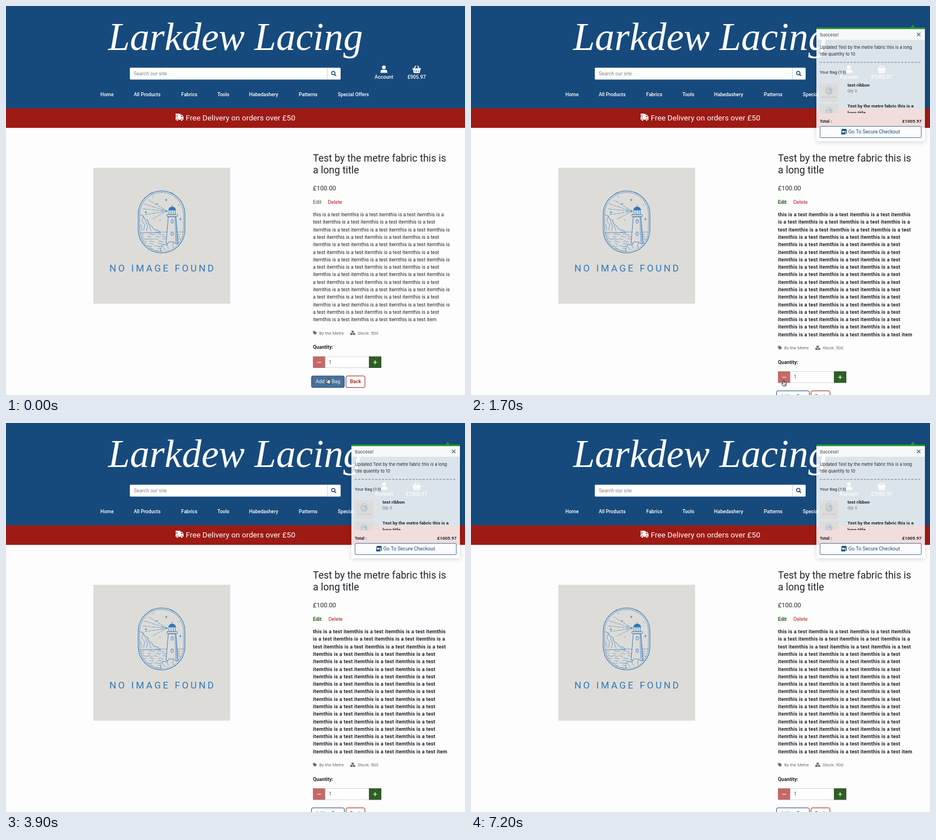
An HTML page with a canvas that plays this animation: 812x690 px, repeating every 7.3 s.

```html
<!DOCTYPE html>
<html lang="en">
<head>
<meta charset="utf-8">
<title>Larkdew Lacing</title>
<style>
html, body { margin: 0; width: 100%; height: 100%; overflow: hidden; background: #fdfdfe; }
canvas { display: block; }
</style>
</head>
<body>
<canvas id="stage" width="812" height="690"></canvas>
<script>
const ctx = document.getElementById('stage').getContext('2d');
const LOOP = 7300, RELOAD = 1500, FADE = 150, CURSOR_GONE = 3200;
const NAVY = '#174a7c', RED = '#9e1a14', GREEN = '#2f5e24', INK = '#212529',
      GREY = '#666a6e', PAPER = '#dddcd9', SKY = '#2f78b9', PAGE = '#fdfdfe';
const SANS = 'Roboto, sans-serif';
const clamp = v => Math.max(0, Math.min(1, v));

function text(str, x, y, size, color, { weight = 400, align = 'left', family = SANS, spacing = 0, style = '' } = {}) {
  ctx.font = `${style} ${weight} ${size}px ${family}`;
  ctx.letterSpacing = spacing + 'px';
  ctx.textAlign = align;
  ctx.fillStyle = color;
  ctx.fillText(str, x, y);
}

function rect(x, y, w, h, color) {
  ctx.fillStyle = color;
  ctx.fillRect(x, y, w, h);
}

function box(x, y, w, h, r, fill, border, width = 1) {
  ctx.beginPath();
  ctx.roundRect(x, y, w, h, r);
  if (fill) { ctx.fillStyle = fill; ctx.fill(); }
  if (border) { ctx.strokeStyle = border; ctx.lineWidth = width; ctx.stroke(); }
}

function shape(d, fill, border, width = 1) {
  const path = new Path2D(d);
  if (fill) { ctx.fillStyle = fill; ctx.fill(path); }
  if (border) { ctx.strokeStyle = border; ctx.lineWidth = width; ctx.stroke(path); }
}

function disc(x, y, r, fill, border, width) {
  box(x - r, y - r, 2 * r, 2 * r, r, fill, border, width);
}

function at(x, y, draw, scale = 1) {
  ctx.save();
  ctx.translate(x, y);
  ctx.scale(scale, scale);
  draw();
  ctx.restore();
}

function random(seed) {
  return () => (seed = (seed * 16807) % 2147483647) / 2147483647;
}

function star(x, y, r) {
  const k = r * 0.2;
  at(x, y, () => shape(`M0 ${-r}L${k} ${-k}L${r} 0L${k} ${k}L0 ${r}L${-k} ${k}L${-r} 0L${-k} ${-k}Z`, SKY));
}

function seaScene() {
  ctx.lineCap = ctx.lineJoin = 'round';
  box(79.5, 41, 82.5, 110, 41.25, null, SKY, 1.1);
  box(82, 43.5, 77.5, 105, 38.75, null, SKY, 0.6);
  ctx.clip();

  ctx.setLineDash([4, 2, 7, 2]);
  for (const [x, y] of [[98, 57], [90, 64], [88, 73], [92, 83], [104, 91]])
    shape(`M131 77L${x} ${y}`, null, SKY, 0.6);
  ctx.setLineDash([]);

  star(129, 57, 3);
  star(93, 79, 3);
  star(154, 91, 3);
  star(113, 64, 2);
  star(106, 51, 1.5);
  star(151, 66, 1.5);
  star(118, 93, 1.5);

  shape('M82 83L88 85L91 91L96 93L98 100L103 103L107 109L115 111L119 115H82', null, SKY, 0.8);
  shape('M88 86L86 95L91 101L89 111M92 94L96 103L94 112M99 103L102 112M84 101L86 111', null, SKY, 0.6);
  shape('M110 114H131M147 114H160', null, SKY, 0.6);

  const rnd = random(41);
  for (let y = 118; y < 149; y += 4.2)
    for (let x = 82 + rnd() * 6; x < 158; x += 9 + rnd() * 8) {
      const w = 5 + rnd() * 6;
      shape(`M${x} ${y}q${w / 4} -2 ${w / 2} 0t${w / 2} 0`, null, SKY, 0.6);
    }

  shape('M133 87H146L150 134H129Z', PAPER, SKY, 0.9);
  for (let y = 89; y < 132; y += 2)
    shape(`M${144 + (y - 89) * 0.03} ${y}H${146 + (y - 89) * 0.08}`, null, SKY, 0.7);
  box(137.5, 92, 4, 6, 1.5, PAPER, SKY, 0.9);
  box(137.5, 114, 4, 6, 1.5, PAPER, SKY, 0.9);
  box(130, 83, 19, 3.5, 1, PAPER, SKY, 0.9);
  box(134, 75, 11, 8, 0, PAPER, SKY, 0.8);
  shape('M137.5 75V83M141.5 75V83M139.5 66V69', null, SKY, 0.8);
  shape('M132.5 75Q134 69 139.5 69Q145 69 146.5 75Z', SKY);
  shape('M119 143L124 136L130 137L134 131L142 132L147 135L154 133L160 140L157 151H122Z', PAPER, SKY, 0.8);
  shape('M130 137L133 143M142 132L140 140L146 144M154 134L151 141M124 141L127 146', null, SKY, 0.6);
}

function placeholder(x, y, scale = 1) {
  at(x, y, () => {
    rect(0, 0, 242, 241, PAPER);
    ctx.save();
    seaScene();
    ctx.restore();
    text('NO IMAGE FOUND', 28.5, 184.3, 16.8, SKY, { spacing: 3.6 });
  }, scale);
}

function header(total) {
  rect(0, 0, 812, 182, NAVY);
  rect(0, 181.5, 812, 34.7, RED);
  text('Larkdew Lacing', 406, 78, 69, '#fff',
    { align: 'center', style: 'italic', family: '"Liberation Serif", serif' });

  box(219, 109.5, 373, 21, 1.5, '#fff');
  rect(568, 110, 1, 20, '#cbd3dc');
  text('Search our site', 226, 122.5, 8.8, '#7f868d');
  disc(579, 119, 3, null, NAVY, 1.4);
  shape('M581.3 121.3L584 124', null, NAVY, 1.7);

  disc(668.5, 108.7, 3.3, '#fff');
  shape('M662.5 118.5V117Q662.5 113 666 113H671Q674.5 113 674.5 117V118.5Z', '#fff');
  text('Account', 668.5, 129, 8.8, '#fff', { weight: 500, align: 'center' });

  shape('M722 111L725 106M731 111L728 106', null, '#fff', 1.5);
  shape('M719 110.5H734V112.5H733L731.7 119H721.3L720 112.5H719Z', '#fff');
  shape('M723.5 114V117.5M726.5 114V117.5M729.5 114V117.5', null, NAVY, 0.9);
  text(total, 726.5, 129, 8.8, '#fff', { weight: 500, align: 'center' });

  const nav = { 'Home': 167, 'All Products': 226, 'Fabrics': 310, 'Tools': 374,
    'Habedashery': 430, 'Patterns': 518, 'Special Offers': 587 };
  for (const [label, x] of Object.entries(nav))
    text(label, x, 160, 8.7, '#fff', { weight: 500 });

  shape('M300 191H308.5V193H311.5L314 196.5V202H300Z', '#fff');
  shape('M298 193.8H304M299 196.6H304', null, RED, 0.9);
  shape('M309.5 194.5H311L312.5 196.8H309.5Z', RED);
  disc(303.2, 202, 2, '#fff', RED, 0.9);
  disc(310.8, 202, 2, '#fff', RED, 0.9);
  text('Free Delivery on orders over £50', 318, 202.5, 13.6, '#fff');
}

function description(bold) {
  const unit = 'itemthis is a test', triple = [unit, unit, unit].join(' ');
  const tail = ' ' + unit + ' ' + unit + ' ';
  let lines;
  if (bold) {
    lines = ['this is a test' + tail + 'itemthis', 'is a test' + tail + 'itemthis is a',
      'test ' + triple, ...Array(13).fill(triple), triple + ' item'];
  } else {
    lines = ['this is a test' + tail + 'itemthis is a', 'test ' + triple];
    for (let i = 0; i < 12; i++) lines.push(i % 2 ? 'a test ' + triple : triple + ' itemthis is');
    lines.push(triple + ' item');
  }
  const look = bold ? { weight: 700, spacing: 0.18 } : {};
  lines.forEach((line, i) => text(line, 543, 373.2 + i * 13.28, bold ? 9 : 8.82, INK, look));
}

function button(label, x, w, color, fill, ink) {
  box(x + 0.5, 656.2, w - 1, 20.5, 2.5, fill, color);
  text(label, x + w / 2, 669, 8.9, ink, { weight: 500, align: 'center' });
}

function orderForm(t, reloaded) {
  shape('M543 576.5H546.5L550 580L546.7 583.3L543 579.7Z', GREY);
  disc(544.6, 578, 0.6, PAGE);
  text('By the Metre', 554, 582.7, 7.8, GREY);
  for (const [x, y] of [[611.3, 576], [609, 580], [613.7, 580]]) box(x, y, 4, 3.6, 0.8, GREY);
  text('Stock: 500', 622, 582.7, 7.8, GREY);
  text('Quantity:', 543, 608.3, 8.8, INK, { weight: 700 });

  box(564.5, 622, 78, 19.5, 0, '#fff', '#d3d8dd');
  rect(543, 621.5, 21.5, 20.5, '#c36a69');
  rect(642, 621.5, 22, 20.5, GREEN);
  shape('M550.5 632H557.5M649.5 632H656.5M653 628.5V635.5', null, '#fff', 1.2);
  text('1', 571, 634.8, 8.8, '#495057');

  const fill = reloaded ? '#fff' : `rgba(23,74,124,${0.78 + 0.22 * clamp(t / FADE)})`;
  const ink = reloaded ? NAVY : `rgba(255,255,255,${0.75 + 0.25 * clamp(t / FADE)})`;
  button('Add to Bag', 540, 59, NAVY, fill, ink);
  button('Back', 601, 34.5, RED, '#fff', RED);
}

function product(t, reloaded) {
  placeholder(154.5, 287);
  text('Test by the metre fabric this is', 543, 275.5, 17.6, INK);
  text('a long title', 543, 296.7, 17.6, INK);
  text('£100.00', 543, 327, 11.2, INK);
  text('Edit', 543, 351.2, 8.9, GREEN, { weight: reloaded ? 700 : 400 });
  text('Delete', reloaded ? 570.5 : 569.5, 351.2, 8.9, '#ac1d17');
  description(reloaded);
  at(0, reloaded ? 26.5 : 0, () => orderForm(t, reloaded));
}

function toastShadow() {
  ctx.save();
  ctx.beginPath();
  ctx.rect(590, 0, 222, 270);
  ctx.rect(611, 38, 192, 202);
  ctx.clip('evenodd');
  ctx.shadowColor = 'rgba(0,0,0,.15)';
  ctx.shadowBlur = 8;
  ctx.shadowOffsetY = 2;
  rect(611, 38, 192, 202, '#fff');
  ctx.restore();
}

function toast(alpha) {
  const bold = { weight: 700 }, inter = { family: 'Inter, sans-serif' };
  ctx.save();
  ctx.globalAlpha = alpha;
  toastShadow();
  shape('M778 38L781.5 33L785 38Z', '#24962f');
  rect(611, 38, 192, 3, '#24962f');
  rect(611, 41, 192, 19, 'rgba(255,255,255,.96)');
  rect(611, 60, 192, 180, 'rgba(255,255,255,.85)');
  text('Success!', 617, 53.5, 7.5, '#5b6167', { ...inter, weight: 600 });
  shape('M789 47.5L795 53.5M795 47.5L789 53.5', null, '#6b6f74', 1.5);
  text('Updated Test by the metre fabric this is a long', 617, 76.3, 7.5, INK, inter);
  text('title quantity to 10', 617, 88, 7.5, INK, inter);
  ctx.setLineDash([4, 2]);
  shape('M617 100H797', null, '#989fac', 1.6);
  ctx.setLineDash([]);
  text('Your Bag (13)', 617, 120, 7.7, INK);

  ctx.save();
  ctx.beginPath();
  ctx.rect(611, 134, 192, 56);
  ctx.clip();
  placeholder(617, 137, 0.137);
  placeholder(617, 174, 0.137);
  text('test ribbon', 666, 143, 8.1, INK, bold);
  text('Qty: 3', 666, 153, 6.6, GREY);
  text('Test by the metre fabric this is a', 666, 180, 8.1, INK, bold);
  text('long title', 666, 191.5, 8.1, INK, bold);
  ctx.restore();

  text('Total :', 617, 207, 7.7, INK, bold);
  text('£1005.97', 797, 207, 7.9, INK, { ...bold, align: 'right' });
  box(617.5, 213.5, 179, 20, 1.5, '#fbfcfd', '#50789e');
  shape('M656.5 218H663.5L665.5 221.5H654.5Z', NAVY);
  shape('M655.7 222V227H661.5V222M664 222V227', null, NAVY, 1.3);
  shape('M655.7 224.5H661.5V227H655.7Z', NAVY);
  text('Go To Secure Checkout', 667.5, 226, 8.8, NAVY);
  ctx.restore();
}

function cursor(t) {
  const move = clamp((t - 50) / 750), ease = move * move * (3 - 2 * move);
  at(571 - 17 * ease, 665 + 4 * ease, () => {
    shape('M-2.2 -4.4Q-1.2 -5.4 -.3 -4.4V-1.6L3 -1Q4 -.6 3.9 .6L3.2 3.2V5H-1.6L-4.3 1.2Q-4.3 -.2 -3 .1L-2.2 .8Z',
      '#fff', '#15191d', 1);
    shape('M-.2 1V3M1.2 1V3M2.5 1V3', null, '#15191d', 0.5);
  });
}

function frame(now) {
  const t = now % LOOP, reloaded = t >= RELOAD;
  rect(0, 0, 812, 690, PAGE);
  header(reloaded ? '£1005.97' : '£905.97');
  product(t, reloaded);
  if (reloaded) toast(clamp((t - RELOAD) / FADE));
  if (t < CURSOR_GONE) cursor(t);
  requestAnimationFrame(frame);
}
requestAnimationFrame(frame);
</script>
</body>
</html>
```
